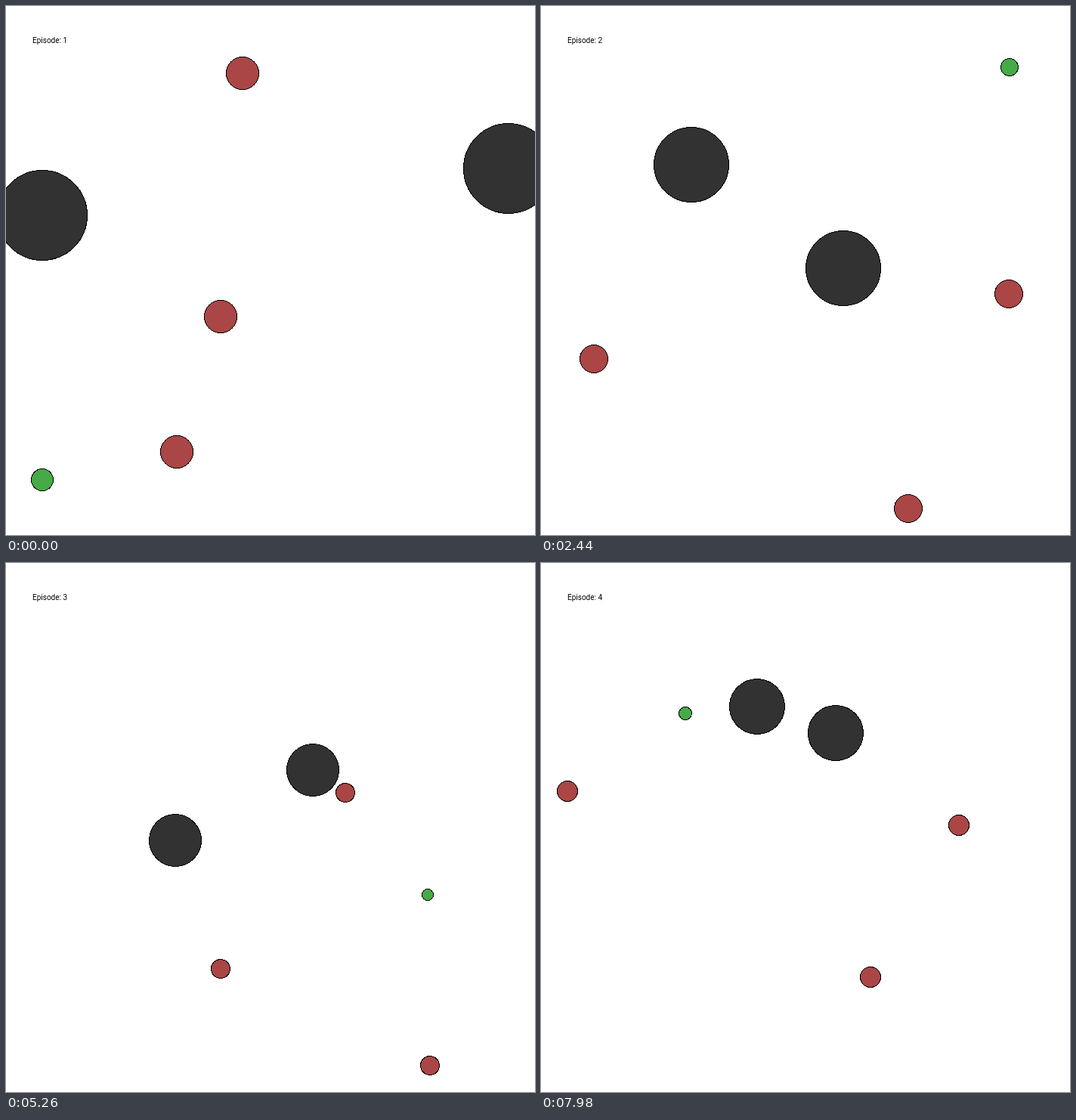
Recreate the animation shown at these times as an HTML page. Size 700 px wide and 700 px high, loop 8 s.

```html
<!DOCTYPE html>
<html lang="en">
<head>
<meta charset="utf-8">
<title>Pursuit episodes</title>
<style>
  html, body { margin: 0; width: 100%; height: 100%; overflow: hidden; background: #fff; }
  svg { display: block; width: 700px; height: 700px; }
  circle { stroke: #000; stroke-width: 1; shape-rendering: crispEdges; }
  text { font: 10px Roboto, "Liberation Sans", sans-serif; fill: #000; }
</style>
</head>
<body>
<svg viewBox="0 0 700 700"><text x="35" y="49"></text></svg>
<script>
const LOOP = 8000, EPISODE = 2320, FIRST = 20, STEP = 100;
const HALF = 350, REACH = 315, BODY = 1.0135, SPEED = .125;
const STAY = { x: 0, y: 0 }, LEFT = { x: -1, y: 0 }, DOWN = { x: 0, y: 1 };

// Distance covered under constant thrust with damping and a speed limit.
function ride(steps) {
  let distance = 0;
  for (let i = 1; i <= steps; i++) distance += SPEED * Math.min(1, 1.2 * (1 - .75 ** i));
  return distance;
}

// A body that passes its legs [step, x, y], then keeps its heading at full thrust.
function go(heading, x, y, ...legs) {
  const stops = [[0, x, y], ...legs];
  return step => {
    const next = stops.findIndex(stop => stop[0] > step);
    const [a, ax, ay] = stops[(next < 0 ? stops.length : next) - 1];
    const gone = ride(step) - ride(a);
    if (next < 0) return [ax + heading.x * gone, ay + heading.y * gone];
    const [b, bx, by] = stops[next];
    const part = gone / (ride(b) - ride(a));
    return [ax + (bx - ax) * part, ay + (by - ay) * part];
  };
}

// Three chasers, the runner, two obstacles.
const kinds = [
  ...Array(3).fill({ size: .075, color: "#aa4646" }),
  { size: .05, color: "#46aa46" },
  ...Array(2).fill({ size: .2, color: "#323232" })
];

const episodes = [
  [
    go(DOWN, -.123, -.87, [13, -.129, .029]),
    go(LEFT, -.22, .203, [9, -1.1, .23], [13, -1.5, .343]),
    go(STAY, -.413, .8, [9, -.413, .8], [13, -.338, .429], [17, -.3, .28]),
    go(STAY, -1.007, .923, [9, -.5, .915], [13, -.119, 1.2333], [18, .1, 1.4]),
    go(STAY, -1.007, -.244),
    go(STAY, 1.05, -.451)
  ],
  [
    go(LEFT, -1.017, .468, [11, -2.17, .462]),
    go(DOWN, 1.076, .03, [11, 1.068, 1.068]),
    go(STAY, .544, 1.26, [11, .544, 1.254]),
    go(STAY, 1.08, -1.0725, [11, 1.0747, -1.116]),
    go(STAY, -.604, -.56),
    go(STAY, .199, -.012)
  ],
  [
    go(LEFT, 1.138, -.304, [6, .56, -.304], [9, .58, -.18], [15, .044, .3]),
    go(STAY, -.373, 1.065, [15, -.379, 1.076]),
    go(DOWN, 1.2115, 1.208, [6, 1.21, 1.68], [15, 1.208, 2.778]),
    go(STAY, 1.185, .546, [15, 1.2, .459]),
    go(STAY, .319, -.4358),
    go(STAY, -.719, .095)
  ],
  [
    go(LEFT, -.545, -.26),
    go(STAY, 1.105, -.016, [11, 1.0955, -.016]),
    go(DOWN, .464, -.086),
    go(STAY, -.93, -.815, [11, -.858, -.815]),
    go(STAY, -.346, -.8635),
    go(STAY, .216, -.6745)
  ]
];

const svg = document.querySelector("svg");
const label = document.querySelector("text");
const circles = kinds.map(({ color }) => {
  const circle = document.createElementNS("http://www.w3.org/2000/svg", "circle");
  circle.setAttribute("fill", color);
  return svg.insertBefore(circle, label);
});

function draw(time) {
  const episode = Math.floor(time / EPISODE);
  const local = time % EPISODE;
  const step = local < FIRST ? 0 : 1 + Math.floor((local - FIRST) / STEP);
  const spots = episodes[episode].map(locate => locate(step));

  // The camera keeps the farthest body at a fixed distance from the centre.
  const zoom = REACH / Math.max(...spots.flat().map(Math.abs));
  const pixel = value => Math.floor(HALF + .4 + value * zoom);

  circles.forEach((circle, i) => {
    circle.setAttribute("cx", pixel(spots[i][0]));
    circle.setAttribute("cy", pixel(spots[i][1]));
    circle.setAttribute("r", Math.floor(kinds[i].size * zoom * BODY) - .5);
  });
  label.textContent = `Episode: ${episode + 1}`;
}

const start = performance.now();
function tick() {
  draw((performance.now() - start) % LOOP);
  requestAnimationFrame(tick);
}
tick();
</script>
</body>
</html>
```
